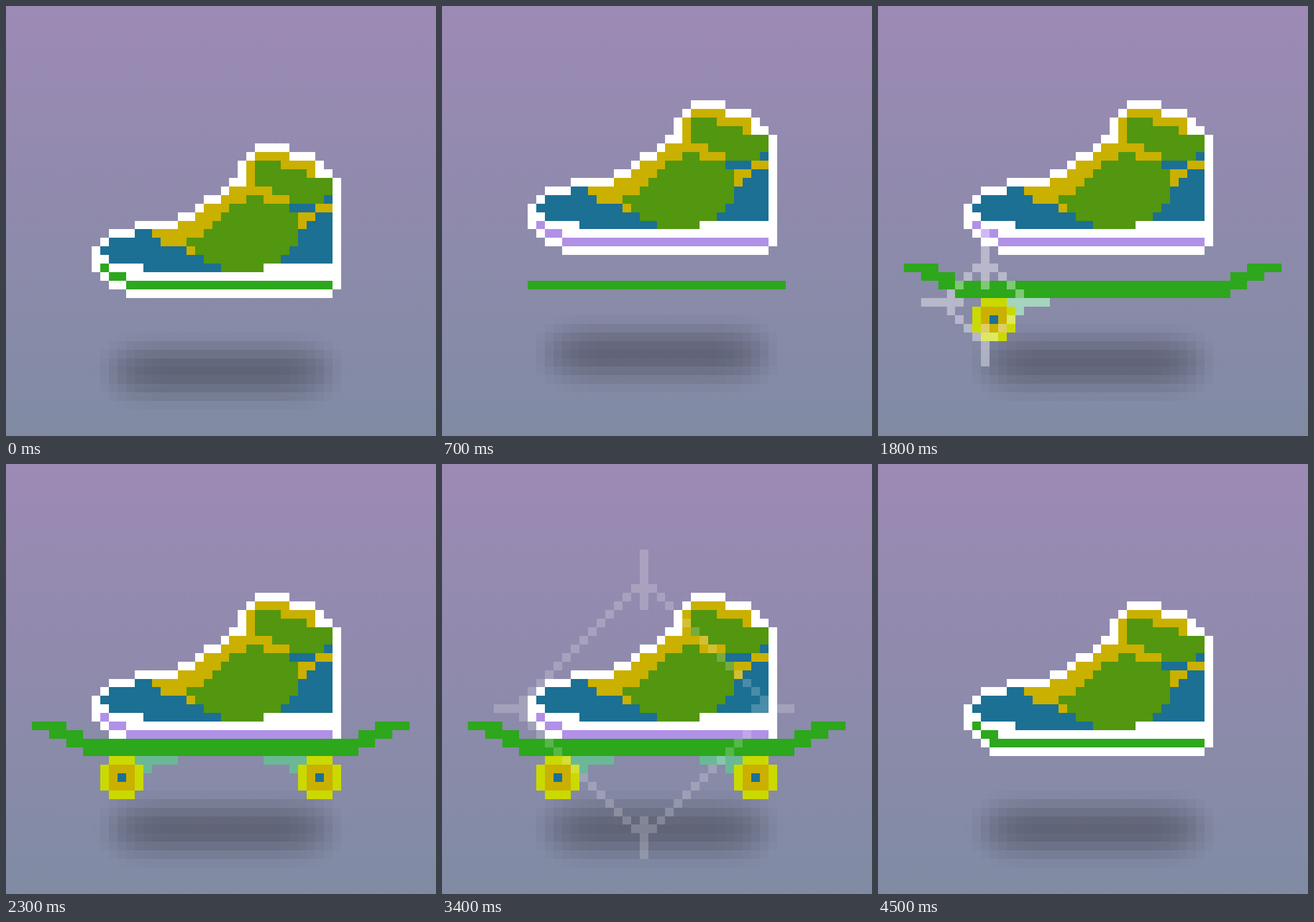
Recreate the animation shown at these times as an HTML page with a canvas. Size 748 by 748 pixels, loop 4600 ms.

```html
<!DOCTYPE html>
<html lang="en">
<head>
<meta charset="utf-8">
<title>Sneaker to skateboard</title>
<style>
html, body { margin: 0; height: 100%; overflow: hidden; background: linear-gradient(#9d8ab5, #808ba3); }
canvas { display: block; width: calc(100vw - 1px); height: calc(100vh - 1px); image-rendering: pixelated; }
</style>
</head>
<body>
<canvas width="50" height="50"></canvas>
<script>
const ctx = document.querySelector('canvas').getContext('2d');
const LOOP = 4600, STEP = 100;
const LEAF = '#53960f', YELLOW = '#cab000', BLUE = '#1b7093';
const DECK = '#2da71c', LILAC = '#b190e8', LIME = '#cad900', TEAL = '#6bb896';

// Shoe layers, painted bottom to top
const shoe = [
  ['#fff', 'M29 16h4v1h3v1h1v1h1v1h1v13h-1v1h-24v-1h-2v-1h-1v-1h-1v-3h1v-1h1v-1h3v-1h5v-1h2v-1h1v-1h2v-1h1v-1h1v-2h1v-1h1z'],
  [LEAF, 'M29 18h6v2h3v10h-8v1h-5v-1h-2v-1h-1v-1h-1v-1h2v-1h1v-1h1v-1h1v-1h2v-1h1z'],
  [BLUE, 'M15 26h2v1h1v1h3v1h2v1h2v1h-9v-1h-4v-1h-1v-1h1v-1h3zM37 22h1v8h-6v-1h1v-1h1v-2h1v-1h1v-1h-3v-1h4z'],
  [YELLOW, 'M29 17h4v1h3v2h-1v-1h-3v-1h-3v3h2v1h2v1h-3v-1h-2v1h-2v1h-1v1h-1v1h-1v1h-2v1h-3v-1h-1v-1h3v-1h2v-1h1v-1h2v-1h1v-1h2v-3h1z' +
    'M21 28h1v1h-1zM36 23h2v1h-2v1h-1v1h-1v-2h2z']
].map(([color, d]) => [color, new Path2D(d)]);
const sole = new Path2D('M11 30h1v1h-1zM12 31h2v1h-2zM14 32h24v1h-24z');

// Stepped tracks: [step, value] pairs
const shoeY = [[0, 16], [3, 14], [4, 12], [5, 11], [23, 15], [42, 13], [43, 11], [44, 13], [45, 16]];
const shoeX = [[0, 0], [26, -1], [27, 0], [28, 1], [29, 0]];
const boardX = [[0, 0], [26, -1], [27, 0], [28, 1], [29, 0], [41, -1], [42, 6], [43, 18], [44, 34]];
const boardY = [[0, 30], [42, 31], [43, 35], [44, 40]];
const shadowY = [[0, 42], [3, 41], [4, 40], [5, 39], [7, 40], [8, 41], [23, 42], [42, 41], [43, 40], [44, 41], [45, 42]];
const at = (track, s) => track.findLast(k => k[0] <= s)[1];

function box(color, x, y, w, h = 1) {
  ctx.fillStyle = color;
  ctx.fillRect(x, y, w, h);
}

function drawShadow(cx, cy) {
  for (let y = -4; y <= 4; y++) for (let x = -15; x < 15; x++) {
    const q = Math.min(1, Math.hypot(Math.abs((x + .5) / 14.8) ** 3, y / 5));
    box(`rgba(0,0,0,${.28 * (1 - q * q * (3 - 2 * q))})`, cx + x, cy + y, 1);
  }
}

function drawShoe(s) {
  ctx.save();
  ctx.translate(at(shoeX, s), at(shoeY, s) - 16);
  for (const [color, path] of shoe) {
    ctx.fillStyle = color;
    ctx.fill(path);
  }
  ctx.fillStyle = s < 6 || s >= 44 ? DECK : LILAC;
  ctx.fill(sole);
  if (s >= 44) {
    box(DECK, 13, 32, 1);
    box('#fff', 13, 33, 1);
  }
  if (s >= 27 && s < 30) {
    const x = (s - 28) * 4;
    ctx.clip(shoe[0][1]);
    box('rgba(255,255,255,.52)', 23 + x, 23, 6);
    box('rgba(255,255,255,.52)', 32 + x, 28, 6);
  }
  ctx.restore();
}

function drawDeck(y, l, r, tip) {
  box(DECK, 3 + l, y, 4);
  box(DECK, 43 + r, y, 4 + tip);
  box(DECK, 5 + l, y + 1, 4);
  box(DECK, 41 + r + tip, y + 1, 4 - tip);
  box(DECK, 7 + l, y + 2, 36 + r - l);
  box(DECK, 9 + l, y + 3, 32 + r - l);
}

function growDeck(s) {
  const left = Math.max(3, 7 - 2 * Math.max(0, s - 8)), right = 41 + 3 * Math.max(0, s - 12);
  ctx.save();
  ctx.beginPath();
  ctx.rect(left, 0, right - left, 34);
  ctx.rect(left, 34, right - left - 1, 2);
  ctx.clip();
  drawDeck(31, 0, 0, 0);
  ctx.restore();
  box(DECK, 46, 30, 1);
}

function drawTruck(x, y, side) {
  box(TEAL, side > 0 ? x + 4 : x - 4, y, 5);
  box(TEAL, side > 0 ? x + 5 : x - 1, y + 1, 1);
}

function drawWheel(x, y) {
  box(LIME, x + 1, y, 3, 5);
  box(LIME, x, y + 1, 5, 3);
  box(YELLOW, x + 1, y + 1, 3, 3);
  box(BLUE, x + 2, y + 2, 1);
}

// Diamond ring with four rays, growing outwards with k
function drawSpark(cx, cy, k) {
  const color = `rgba(255,255,255,${k > 2 ? .2 : .39})`, ring = 2 * k + 1, near = 2 * k - 1;
  for (let x = 1 - ring; x < ring; x++) {
    const y = ring - Math.abs(x);
    if (!x) continue;
    box(color, cx + x, cy - y, 1);
    box(color, cx + x, cy + y, 1);
  }
  box(color, cx - near - 4, cy, 5);
  box(color, cx + near, cy, 5);
  box(color, cx, cy - near - 5, 1, 7);
  box(color, cx, cy + near, 1, 5);
}

function drawBoard(s) {
  if (s === 6) return box(DECK, 13, 30, 26);
  if (s === 7) return box(DECK, 10, 32, 30);
  if (s < 16) return growDeck(s);
  const lean = s === 28 ? 1 : 0, l = at(boardX, s), r = l - lean, y = at(boardY, s);
  const wheels = [];
  if (s >= 17) wheels.push([11 + l, 1]);
  if (s >= 19) wheels.push([34 + r, -1]);
  for (const [x, side] of wheels) drawTruck(x, y + 4, side);
  drawDeck(y, l, r, lean);
  for (const [x] of wheels) drawWheel(x, y + 4);
  if (s < 20) drawSpark(12, 34, s - 16);
  if (s === 19 || s === 20) drawSpark(37, 34, 2 * (s - 19) + 1);
  if (s >= 32 && s < 35) drawSpark(23, 28, 2 * (s - 32) + 3);
}

function frame(now) {
  const s = Math.floor(now % LOOP / STEP);
  ctx.clearRect(0, 0, 50, 50);
  drawShadow(s === 41 ? 24 : 25, at(shadowY, s));
  drawShoe(s);
  if (s >= 6 && s < 45) drawBoard(s);
  requestAnimationFrame(frame);
}
requestAnimationFrame(frame);
</script>
</body>
</html>
```
